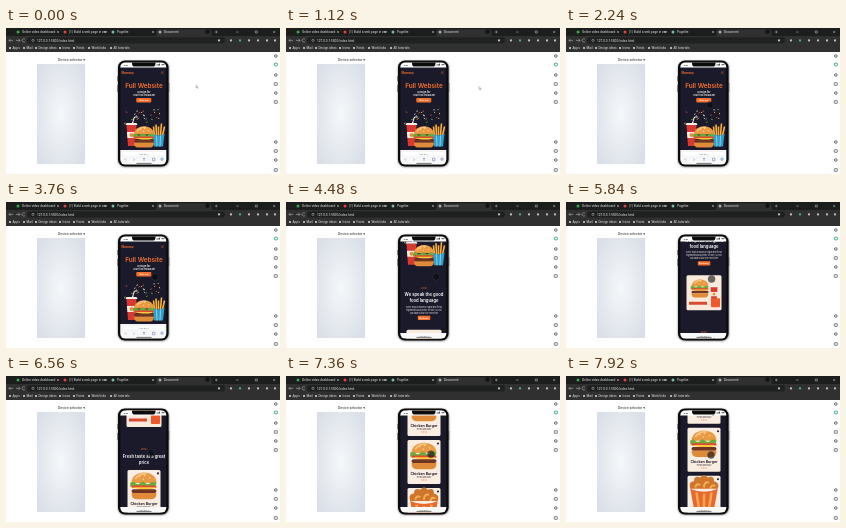
Animation of 274 by 146 pixels, one loop 8 s. Source, as an HTML page:

```html
<!DOCTYPE html>
<html lang="en">
<head>
<meta charset="utf-8">
<style>
html, body { margin: 0; width: 100%; height: 100%; overflow: hidden; background: #fff; }
svg { display: block; width: 100vw; height: 100vh; }
text { font-family: Roboto, Arial, sans-serif; }
#chrome text { font-size: 3.2px; fill: #e4e5e6; }
#page text { font-family: Inter, Arial, sans-serif; fill: #fff; text-anchor: middle; font-size: 2px; }
#page .h { font-size: 4.2px; font-weight: 600; }
#page .o { fill: #f4702f; }
#page .btn { font-size: 1.8px; font-weight: 700; }
#page .dark { fill: #26222c; }
#page .name { fill: #26222c; font-size: 3.6px; font-weight: 700; }
</style>
</head>
<body>
<svg viewBox="0 0 274 146">
  <defs>
    <radialGradient id="glow" cx=".5" cy=".5" r=".75">
      <stop stop-color="#f5f7fa"/><stop offset=".45" stop-color="#e7ebf0"/><stop offset="1" stop-color="#d5dbe5"/>
    </radialGradient>
    <clipPath id="screen"><rect x="114.3" y="34.4" width="46" height="102.2" rx="5"/></clipPath>
    <filter id="soft" x="-20%" y="-20%" width="140%" height="140%"><feGaussianBlur stdDeviation="1.2"/></filter>

    <!-- Food is drawn around its own centre -->
    <g id="burger">
      <path d="M-10 -2C-10 -13 10 -13 10 -2Z" fill="#e99a43"/>
      <path d="M-7 -5Q-4 -10 2 -9" fill="none" stroke="#f8c580" stroke-width="1.4"/>
      <path d="M-4 -7h1M0 -8h1M4 -6h1M-1 -5h1" stroke="#fff0c9" stroke-width=".7"/>
      <path d="M-11 -2q2 -2 4 0t4 0 4 0 4 0 5 0l-1 3h-20z" fill="#6caa3c"/>
      <rect x="-10" y="0" width="20" height="2" rx="1" fill="#e34b2f"/>
      <path d="M-10 1.5h20l-5 2 -3 2 -4 -2z" fill="#ffc93e"/>
      <rect x="-10" y="3" width="20" height="3" rx="1.5" fill="#6f3520"/>
      <path d="M-10 6h20q0 5 -4 5h-12q-4 0 -4 -5z" fill="#df8b3a"/>
    </g>
    <g id="fries">
      <path d="M-4 0l-1 -9M-2 0l-.5 -11M0 0v-9M2 0l1 -12M4 0l2 -9" stroke="#ffb23a" stroke-width="1.6"/>
      <path d="M-6 -2q6 4 12 0l-1.5 13h-9z" fill="#2f9fca"/>
      <path d="M-2 0l.5 11M2 0l-.5 11" stroke="#8fd0e6" stroke-width="1"/>
    </g>
    <g id="cup">
      <path d="M1 -12l2 -6h3" fill="none" stroke="#f3eee8" stroke-width="1"/>
      <path d="M-5 -12h10l1 2h-12z" fill="#f1eee8"/>
      <path d="M-5 -10h10l-1.5 21h-7z" fill="#d83a32"/>
      <path d="M-4.6 -3h9.2l-.5 6h-8.2z" fill="#f6eee4"/>
      <circle r="2" fill="#ee8c36"/>
    </g>
    <g id="bucket">
      <path d="M-11 -2q-2 -6 3 -6q0 -5 5 -3q3 -4 6 0q5 -2 5 3q5 1 3 6z" fill="#cf762c"/>
      <path d="M-7 -3q1 -4 4 -2M0 -3q0 -5 4 -4M5 -2q1 -4 4 -2" fill="none" stroke="#f1ae55" stroke-width="1.6"/>
      <path d="M-11 -2q11 5 22 0l-3 16h-16z" fill="#e8692d"/>
      <path d="M-6 1l2 13M0 2v12M6 1l-2 13" stroke="#f4a650" stroke-width="2"/>
    </g>
    <path id="arrow" d="M0 0v3l.7 -.6 .5 1.1 .5 -.2 -.5 -1.1h1z" fill="#fff" stroke="#666" stroke-width=".35"/>
  </defs>

  <rect width="274" height="146" fill="#fff"/>

  <g id="chrome">
    <path d="M0 0h274v24H0z" fill="#303031"/>
    <path d="M0 0h274v8H0z" fill="#1c1d1d"/>
    <path d="M149 8q1.5 0 1.5 -2V3q0 -1.8 2 -1.8h51q2 0 2 1.8v3q0 2 1.5 2z" fill="#303031"/>
    <rect x="21" y="9.3" width="198" height="6.2" rx="3.1" fill="#1f2020"/>
    <circle cx="201.5" cy="3.6" r="2.3" fill="#141414"/>
    <g fill="none" stroke="#c5c6c7" stroke-width=".5">
      <path d="M7 12.4H3m1.5 -1.5L3 12.4l1.5 1.5M10 12.4h4m-1.5 -1.5 1.5 1.5 -1.5 1.5M19 11.2a1.7 1.7 0 1 0 .2 2.2"/>
      <path d="M230 4h2.6M249.3 3h2v2h-2zM267.2 3l2 2m0 -2l-2 2M209 4h2.6m-1.3 -1.3v2.6"/>
      <circle cx="27" cy="12.4" r="1.1"/>
    </g>
  </g>

  <g id="sidebar"></g>

  <text x="79" y="33.2" text-anchor="end" font-size="3.6" fill="#25272b">Device selector &#9662;</text>
  <rect x="31" y="36" width="48" height="100" fill="url(#glow)"/>

  <rect x="112" y="33" width="51" height="106" rx="7" fill="#000" opacity=".5" filter="url(#soft)"/>
  <rect x="112" y="32.4" width="50.6" height="106.2" rx="7" fill="#0b0b0c"/>
  <path d="M111.8 48v5M111.8 57v7M162.8 55v9" stroke="#333" stroke-width=".7"/>
  <g clip-path="url(#screen)">
    <rect x="114" y="34" width="47" height="103" fill="#1b1a2b"/>
    <g id="page">
      <text x="122" y="45.8" class="o" style="font-size:3.2px;font-weight:700">Nommy.</text>
      <path d="M155 44h2.6M155 45.2h2.6" stroke="#f4702f" stroke-width=".4"/>
      <text x="138" y="60.3" class="o" style="font-size:6.4px;font-weight:600">Full Website</text>
      <text x="138" y="65" style="font-size:2.6px;font-weight:600">Design for</text>
      <text x="138" y="68.1" style="font-size:2.2px;font-weight:600">your food restaurant</text>
      <rect x="130.3" y="70" width="15" height="4.4" rx=".8" fill="#f4702f"/>
      <text x="137.8" y="72.9" class="btn">Order now</text>
      <g id="confetti" fill="none" stroke-width=".8"></g>
      <use href="#fries" x="152.5" y="107.5"/>
      <use href="#cup" x="125.5" y="107"/>
      <use href="#burger" x="138" y="108.5"/>

      <text x="138" y="142" class="o">- About -</text>
      <text x="138" y="149.4" class="h">We speak the good</text>
      <text x="138" y="155.6" class="h">food language</text>
      <text x="138" y="161">Every dish is made by hand with fresh</text>
      <text x="138" y="164">ingredients and plenty of love, so you</text>
      <text x="138" y="167">can taste a story in every bite</text>
      <rect x="131.8" y="169" width="12.5" height="4.2" rx=".8" fill="#f4702f"/>
      <text x="138" y="171.8" class="btn">Read more</text>
      <rect x="120.5" y="183" width="35" height="35" rx="1.5" fill="#f9eadb"/>
      <use href="#burger" transform="translate(134 196) scale(.85)"/>
      <use href="#cup" transform="translate(148 202) scale(.7)"/>
      <rect x="145" y="206" width="9" height="9" rx="1" fill="#f0592c"/>
      <path d="M123 211h18" stroke="#d84b31" stroke-width="3"/>

      <text x="138" y="240.8" class="o">- Menu -</text>
      <text x="138" y="249" class="h">Fresh taste at a great</text>
      <text x="138" y="255.3" class="h">price</text>
      <g id="cards"></g>
    </g>
    <path d="M114 34h47v5.5h-47z" fill="#fff"/>
    <text x="117.5" y="38" font-size="2.5" font-weight="700" fill="#222">9:41</text>
    <path d="M151 37.6v-1M152.2 37.6v-1.6M153.5 37.6v-2M155.5 36.7h3" stroke="#222" stroke-width=".8"/>
    <path d="M126 34h23.5v1.7q0 2.8 -2.8 2.8h-17.9q-2.8 0 -2.8 -2.8z" fill="#0b0b0c"/>
    <g id="bar">
      <rect x="114" y="122" width="47" height="24" fill="#f8f8f9"/>
      <g id="tools">
        <rect x="116.5" y="123.4" width="42" height="4.6" rx="1.2" fill="#fff" stroke="#e1e2e5" stroke-width=".4"/>
        <path d="M120 130.5l-1 1 1 1M127.5 130.5l1 1 -1 1M138 133v-3m-1 1l1 -1 1 1M146.5 130.2h2.4v2.6h-2.4zM155 130.2h2v2h-2z" fill="none" stroke="#4a6fae" stroke-width=".5"/>
      </g>
      <text id="host" x="138" y="126.5" font-size="2.3" text-anchor="middle" fill="#45484c">127.0.0.1</text>
    </g>
    <path d="M130.5 135.4h15" stroke="#222" stroke-width=".6"/>
  </g>
  <use id="pointer" href="#arrow"/>
  <circle id="touch" r="3.5" fill="#08080d" fill-opacity=".6" stroke="#444" stroke-width=".4"/>
</svg>

<script>
const LOOP = 8000;
const $ = id => document.getElementById(id);
const add = (id, markup) => $(id).insertAdjacentHTML('beforeend', markup);
const label = (x, y, text) => `<text x="${x}" y="${y}">${text}</text>`;
const dot = (x, y, r, color) => `<circle cx="${x}" cy="${y}" r="${r}" fill="${color}"/>`;

// Browser tabs, bookmarks and toolbar buttons
[[12, 'Online video dashboard', '#38a852'], [59, '(1) Build a web page in one', '#e84242'],
 [107, 'Pagelite', '#75bda4'], [154, 'Document', '#a6abae']].forEach(([x, text, color], i) => {
  add('chrome', dot(x, 4, 1.5, color) + label(x + 4, 5.2, text));
  if (i < 3) add('chrome', `<path d="M${x + 39} 3l2 2m0 -2l-2 2" stroke="#c5c6c7" stroke-width=".5"/>`);
});
add('chrome', label(31, 13.6, '127.0.0.1:5500/index.html'));
[[4, 'Apps'], [18, 'Mail'], [30, 'Design ideas'], [54, 'Icons'], [68, 'Fonts'],
 [83, 'Work links'], [105, 'All tutorials']].forEach(([x, text]) =>
  add('chrome', dot(x, 20, 1, '#dddee0') + label(x + 2.5, 21.1, text)));
[213, 225, 234, 243, 252, 261, 269].forEach((x, i) =>
  add('chrome', dot(x, 12.4, 1.1, i === 2 ? '#57b782' : '#c2c4c6')));

// Narrow tool column on the right
[28, 36.5, 47, 56, 65, 74, 114, 123, 132, 142].forEach((y, i) => {
  const color = i === 1 ? '#35a875' : '#5f676f';
  add('sidebar', i % 2
    ? `<rect x="268.3" y="${y - 1.3}" width="3" height="2.6" rx=".5" fill="none" stroke="${color}" stroke-width=".9"/>`
    : `<circle cx="269.8" cy="${y}" r="1.3" fill="none" stroke="${color}" stroke-width="1"/>`);
});

let seed = 7;
const random = () => (seed = seed * 16807 % 2147483647) / 2147483647;
for (let i = 0; i < 26; i++) {
  const x = 119 + random() * 37, y = 80 + random() * 16, turn = random() * 360;
  add('confetti', `<path d="M0 0h1.5" transform="translate(${x} ${y}) rotate(${turn})"
    stroke="${['#f2b84b', '#7fc25a', '#e85b3b', '#dfe6e8'][i % 4]}"/>`);
}

['burger', 'burger', 'bucket', 'burger'].forEach((food, i) => {
  const y = 261 + i * 48;
  add('cards', `<rect x="121.5" y="${y}" width="33" height="44" rx="1.5" fill="#faeee2"/>
    <use href="#${food}" transform="translate(138 ${y + 15.5}) scale(1.25)"/>
    <text x="138" y="${y + 35}" class="name">Chicken Burger</text>
    <text x="138" y="${y + 38.4}" class="dark">Fresh and tasty</text>
    <text x="138" y="${y + 41.2}" class="o">$ 9.50</text>
    ${dot(152, y + 3.5, 1.1, '#292333')}`);
});

// Each key is a time followed by its values
const scrollKeys = [[0, 0], [3840, 0], [4560, 62], [5240, 62], [6560, 167], [7360, 245], [8000, 259]];
const cursorKeys = [[0, 190, 57], [880, 190, 57], [1360, 196, 60], [1840, 196, 64], [2200, 144, 77],
  [2720, 144, 77], [3600, 149, 75], [4440, 149, 75], [4760, 179, 70], [5040, 173, 71],
  [5280, 146, 77], [6560, 145, 77], [8000, 145, 79]];

const linear = p => p;
const smooth = p => p * p * (3 - 2 * p);
function sample(keys, t, ease) {
  const i = Math.max(1, keys.findIndex(key => key[0] >= t));
  const a = keys[i - 1], b = keys[i];
  const p = ease((t - a[0]) / (b[0] - a[0]));
  return a.slice(1).map((v, j) => v + (b[j + 1] - v) * p);
}

function draw(now) {
  const t = now % LOOP;
  const [scroll] = sample(scrollKeys, t, linear);
  const [x, y] = sample(cursorKeys, t, smooth);
  const fold = Math.min(1, scroll / 25);
  const inPhone = x > 114 && x < 160;
  const place = (id, dx, dy) => $(id).setAttribute('transform', `translate(${dx} ${dy})`);
  place('page', 0, -scroll);
  place('bar', 0, 9 * fold);
  place('host', 0, -fold);
  $('tools').setAttribute('opacity', 1 - fold);
  place('pointer', x, y);
  place('touch', x, y);
  $('pointer').style.display = inPhone ? 'none' : '';
  $('touch').style.display = inPhone ? '' : 'none';
  requestAnimationFrame(draw);
}
requestAnimationFrame(draw);
</script>
</body>
</html>
```
